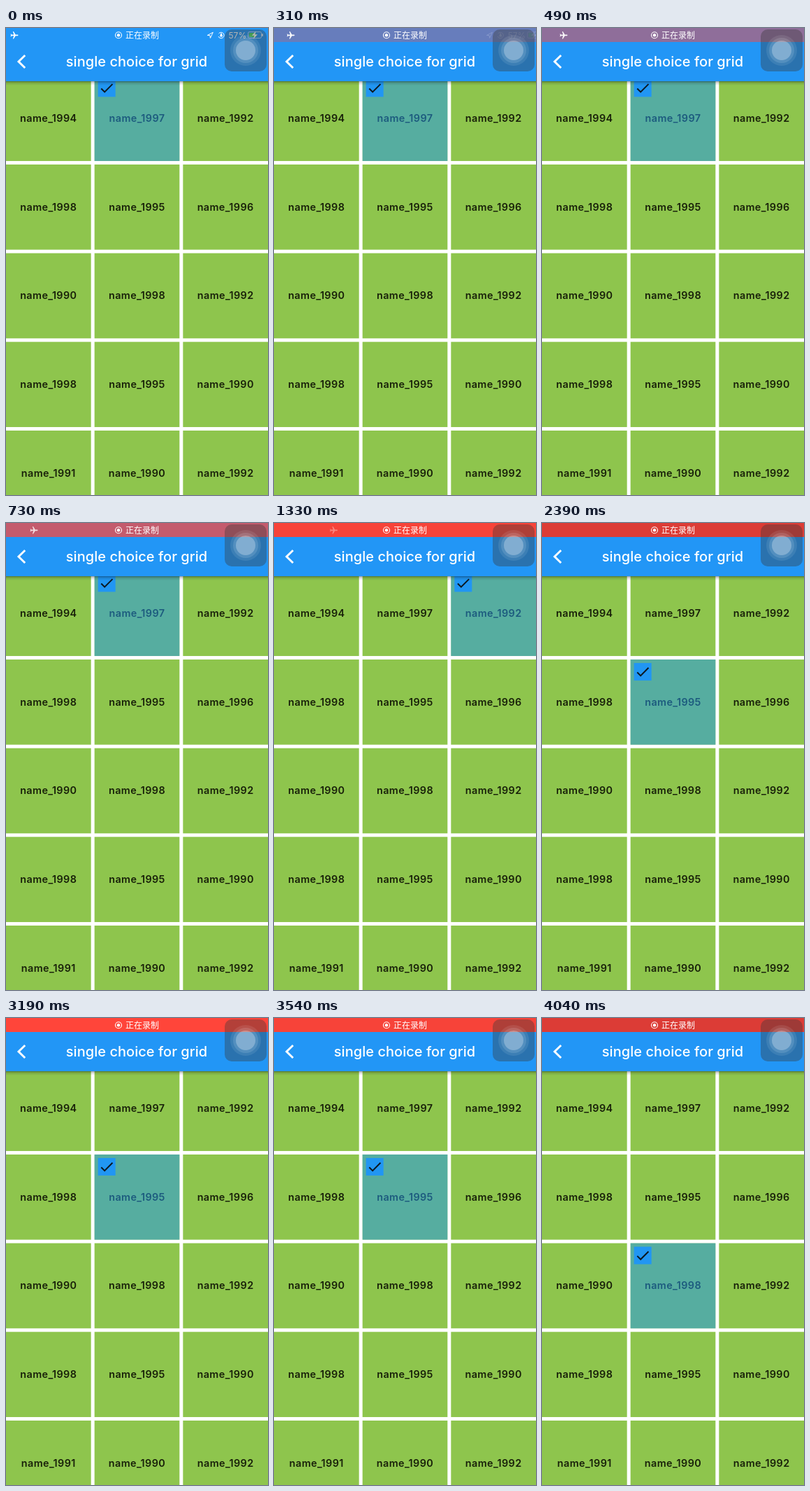
An HTML page that plays this animation: 375 by 667 pixels, repeating every 4.09 s.

```html
<!DOCTYPE html>
<html lang="en">
<head>
<meta charset="utf-8">
<title>Single choice grid</title>
<style>
  html, body { margin: 0; width: 100%; height: 100%; overflow: hidden; background: #fff; }
  svg { display: block; width: 375px; height: 667px; }
  text { font-family: Inter, Roboto, sans-serif; }
  .name { font-size: 14.4px; font-weight: 600; letter-spacing: .4px; text-anchor: middle; fill: #182009; }
  .title { font-size: 20px; font-weight: 500; letter-spacing: .04px; text-anchor: middle; fill: #fff; }
  .status { font-size: 12px; fill: #fff; }
  .cjk { font-family: "Noto Sans CJK SC", "Noto Sans CJK", sans-serif; }
</style>
</head>
<body>
<svg viewBox="0 0 375 667">
  <defs>
    <linearGradient id="shade" x2="0" y2="1">
      <stop offset="0" stop-color="#000" stop-opacity=".38"/>
      <stop offset=".4" stop-color="#000" stop-opacity=".14"/>
      <stop offset="1" stop-color="#000" stop-opacity="0"/>
    </linearGradient>
  </defs>
  <rect width="375" height="667" fill="#fff"/>
  <g id="grid"></g>
  <g id="selection">
    <rect id="tint" fill="#2196f3" fill-opacity=".5"/>
    <rect x="5" y="5" width="25" height="25" fill="#2196f3"/>
    <path transform="translate(5.5 5.5)" fill="#0c1820"
      d="M9 16.17L4.83 12l-1.42 1.41L9 19 21 7l-1.41-1.41z"/>
  </g>

  <rect y="76" width="375" height="6" fill="url(#shade)"/>
  <rect width="375" height="76" fill="#2296f6"/>
  <path d="M27.2 39L18 48L27.2 57" fill="none" stroke="#fff" stroke-width="2.9"/>
  <text class="title" x="187" y="55">single choice for grid</text>

  <rect id="bar" width="375" height="20"/>
  <g id="plane">
    <path transform="rotate(90) scale(.55) translate(-11.5 -12)" fill="#fff"
      d="M21 16v-2l-8-5V3.5C13 2.67 12.33 2 11.5 2S10 2.67 10 3.5V9l-8 5v2l8-2.5V19l-2 1.5V22l3.5-1 3.5 1v-1.5L13 19v-5.5z"/>
  </g>
  <circle cx="161" cy="10.3" r="4.5" fill="none" stroke="#fff" stroke-width="1.1"/>
  <circle cx="161" cy="10.3" r="2.2" fill="#fff"/>
  <text class="status cjk" x="171" y="14.6">正在录制</text>
  <g id="indicators">
    <path d="M288.3 10.4L296.3 6.2L292.4 14.4L291.9 10.7Z" fill="none" stroke="#fff"/>
    <path d="M304.5 8A4.2 4.2 0 1 1 304 12" fill="none" stroke="#fff"/>
    <path d="M306.4 9.7h3.4v2.8h-3.4zM307 9.7v-1a1.1 1.1 0 0 1 2.2 0v1" fill="#fff"/>
    <text class="status" x="318.5" y="14.5">57%</text>
    <rect x="346.5" y="5.5" width="19" height="9" rx="2" fill="none" stroke="#fff" stroke-opacity=".6"/>
    <rect x="348" y="7" width="9.5" height="6" rx="1" fill="#4cd964"/>
    <path d="M367 8.3v3.4" stroke="#fff" stroke-width="1.5"/>
    <path d="M357.8 4.5L351.8 10.7H355.5L353.8 15.7L360 9.2H356.2Z" fill="#fff"/>
  </g>

  <rect x="313" y="2" width="60" height="60" rx="10" fill="#383838" fill-opacity=".38"/>
  <g fill="#f0f8ff">
    <circle cx="343" cy="32" r="22" fill-opacity=".09"/>
    <circle cx="343" cy="32" r="18" fill-opacity=".13"/>
    <circle cx="343" cy="32" r="14" fill-opacity=".29"/>
  </g>
</svg>
<script>
const LOOP = 4090;
const GAP = 5;
const CELL = (375 - 2 * GAP) / 3;
const TOP = 68.3;
const YEARS = [
  [1994, 1997, 1992],
  [1998, 1995, 1996],
  [1990, 1998, 1992],
  [1998, 1995, 1990],
  [1991, 1990, 1992]
];
// Each choice: start time, column, row
const CHOICES = [[0, 1, 0], [960, 2, 0], [2190, 1, 1], [3590, 1, 2]];
const PLANE_X = [[0, 12], [490, 31], [730, 40], [1330, 85.5], [1750, 96]];
const PLANE_ALPHA = [[0, 1], [490, .95], [730, .8], [1330, .36], [1750, 0]];
const BLUE = [34, 150, 246];
const DARK_RED = [214, 58, 53];
const BRIGHT_RED = [255, 69, 58];
const PULSE_START = 1000;
const PULSE_PERIOD = 2210;

const el = id => document.getElementById(id);
const clamp = v => Math.max(0, Math.min(1, v));
const mix = (a, b, p) => a + (b - a) * p;
const mixColor = (a, b, p) => a.map((v, i) => mix(v, b[i], p));
const cellX = col => col * (CELL + GAP);
const cellY = row => TOP + row * (CELL + GAP);

function track(keys, t) {
  const next = keys.findIndex(([time]) => time > t);
  if (next < 0) return keys[keys.length - 1][1];
  const [t0, v0] = keys[next - 1], [t1, v1] = keys[next];
  return mix(v0, v1, (t - t0) / (t1 - t0));
}

// Blue turns to bright red, which then pulses
function barColor(t) {
  if (t < PULSE_START) return mixColor(BLUE, BRIGHT_RED, t / PULSE_START);
  const phase = (t - PULSE_START) / PULSE_PERIOD * 2 * Math.PI;
  return mixColor(DARK_RED, BRIGHT_RED, .5 + .5 * Math.cos(phase));
}

function add(parent, tag, attrs, text = "") {
  const node = document.createElementNS("http://www.w3.org/2000/svg", tag);
  for (const key in attrs) node.setAttribute(key, attrs[key]);
  node.textContent = text;
  parent.append(node);
}

YEARS.forEach((years, row) => years.forEach((year, col) => {
  const x = cellX(col), y = cellY(row);
  add(el("grid"), "rect", { x, y, width: CELL, height: CELL, fill: "#8ec54d" });
  add(el("grid"), "text", { class: "name", x: x + CELL / 2, y: y + CELL / 2 + 4.7 }, "name_" + year);
}));
el("tint").setAttribute("width", CELL);
el("tint").setAttribute("height", CELL);

function render(t) {
  const [, col, row] = CHOICES.filter(([start]) => start <= t).pop();
  el("selection").setAttribute("transform", `translate(${cellX(col)} ${cellY(row)})`);

  el("bar").setAttribute("fill", `rgb(${barColor(t).map(Math.round)})`);

  el("plane").setAttribute("transform", `translate(${track(PLANE_X, t)} 10.3)`);
  el("plane").setAttribute("opacity", track(PLANE_ALPHA, t));

  const leave = clamp((t - 20) / 360);
  el("indicators").setAttribute("transform", `translate(${leave * 20} 0)`);
  el("indicators").setAttribute("opacity", 1 - leave);
}

const start = performance.now();
function tick() {
  render((performance.now() - start) % LOOP);
  requestAnimationFrame(tick);
}
tick();
</script>
</body>
</html>
```
